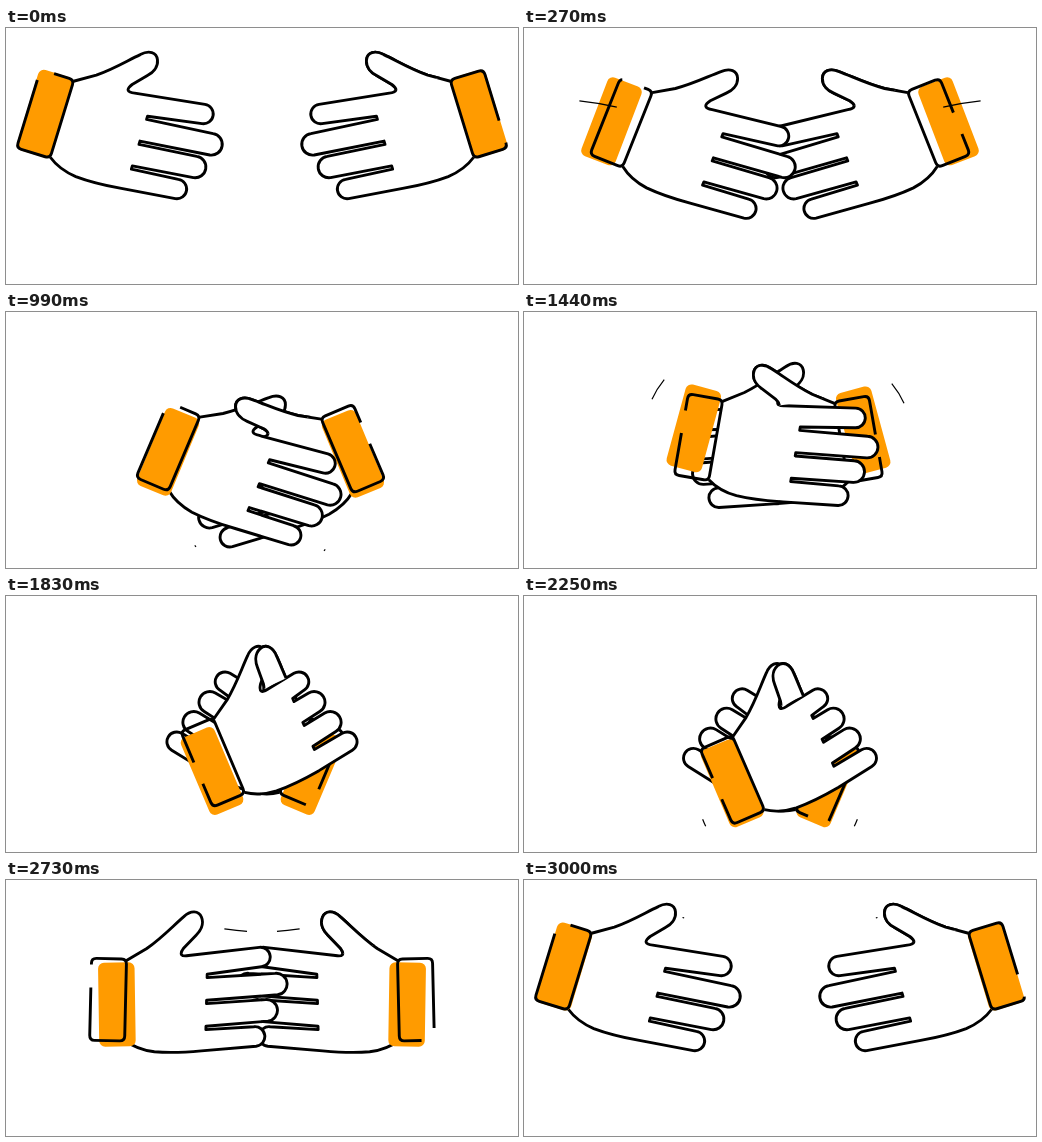
Write an HTML page that moves like this. It is 512x256 px and loops after 3030 ms.

```html
<!DOCTYPE html>
<html lang="en">
<head>
<meta charset="utf-8">
<title>Handshake</title>
<style>
  html, body { margin: 0; width: 100%; height: 100%; overflow: hidden; background: #fff; }
  svg { display: block; width: 100vw; height: 100vh; }
  .line { stroke: #000; stroke-width: 2.9; stroke-linejoin: round; fill: none; }
  .skin { fill: #fff; }
  .cloth { fill: #ff9b00; }
  .trail { stroke: #000; stroke-width: 1.2; fill: none; }
</style>
</head>
<body>
<svg viewBox="0 0 512 256">
  <defs><clipPath id="thumbClip"><polygon id="thumbArea"/></clipPath></defs>
  <g id="stage"></g>
</svg>
<script>
const LOOP = 3030, STEP = 30, WIDTH = 512;
const CUFF_LENGTH = 225.4, GAP = 23;
const CLOTH_LAG = 60, CLOTH_REACH = 10;
const stage = document.getElementById('stage');
const thumbArea = document.getElementById('thumbArea');

// Wrist of the left hand at each turning point; the right hand mirrors it.
const MOVES = [
  { at: 0, x: 56, y: 91, turn: 17 },         // apart
  { at: 560, x: 178, y: 113, turn: 27 },     // meet
  { at: 900, x: 178.5, y: 148, turn: 22.5 }, // shake down
  { at: 1250, x: 177, y: 106, turn: 26 },    // shake up
  { at: 1740, x: 222, y: 174, turn: -23 },   // clasp
  { at: 1950, x: 224.5, y: 137, turn: -23 }, // clasp up
  { at: 2160, x: 224.5, y: 181, turn: -23 }, // clasp down
  { at: 2400, x: 224.5, y: 168, turn: -24.5 }, // let go
  { at: 2970, x: 56, y: 91, turn: 17 },      // apart
  { at: LOOP, x: 56, y: 91, turn: 17 }
];
const TRAILS = [
  { from: 100, to: 578, d: 'M45 72Q85 75 126 88' },
  { from: 985, to: 1220, d: 'M190 235Q174 215 167 195' },
  { from: 1340, to: 1540, d: 'M148 59Q130 77 124 98' },
  { from: 2210, to: 2460, d: 'M182 231Q176 218 172 203' },
  { from: 2678, to: 3003, d: 'M243 51.5Q215 50 158.5 37.5' }
];
const FINGER_REACH = [143.5, 161, 152, 140];
const FINGER_TILT = -8 * Math.PI / 180;

const mix = (a, b, k) => a + (b - a) * k;
const clamp = v => Math.max(0, Math.min(1, v));
const ease = k => (1 - Math.cos(Math.PI * k)) / 2;
const wave = (t, peak) => Math.cos(2 * Math.PI * (t - peak) / LOOP);

const mixPose = (a, b, k) => ({
  x: mix(a.x, b.x, k), y: mix(a.y, b.y, k), turn: mix(a.turn, b.turn, k)
});

function poseAt(time) {
  const t = (time + LOOP) % LOOP;
  const i = MOVES.findIndex(move => move.at > t);
  const a = MOVES[i - 1], b = MOVES[i];
  return mixPose(a, b, ease((t - a.at) / (b.at - a.at)));
}

// The cloth trails behind the hand, but never further than its reach.
function clothPose(t, hand) {
  const late = poseAt(t - CLOTH_LAG);
  const distance = Math.hypot(late.x - hand.x, late.y - hand.y) || 1;
  return mixPose(hand, late, CLOTH_REACH * Math.tanh(distance / CLOTH_REACH) / distance);
}

function handPath(curl) {
  const cos = Math.cos(FINGER_TILT), sin = Math.sin(FINGER_TILT);
  let d = 'M0-39.5L20-52C35-63 45-74.5 56-84.5C63-91.5 71-91.5 74-84.5C77-77.5 73-70.5 69-66.5'
    + 'L57-53.5C52-46.5 55-44.5 62-46';
  FINGER_REACH.forEach((reach, i) => {
    const r = i % 3 ? 10.8 : 9.8;
    const x = mix(reach, 103 + 7 * i, curl) - r * cos;
    const y = mix(26.5 * i - 47.5, 24.7 * i - 42, curl) - r * sin;
    d += `L${x + r * sin} ${y - r * cos}A${r} ${r} 0 0 1 ${x - r * sin} ${y + r * cos}`;
    if (i < 3) d += `L81 ${26 * i - 27.7}v3.4`;
  });
  return d + 'L77 49C60 51 45 52 30 51C20 50 8 46 0 40';
}

function add(parent, tag, attrs = {}) {
  const el = document.createElementNS('http://www.w3.org/2000/svg', tag);
  for (const name in attrs) el.setAttribute(name, attrs[name]);
  return parent.appendChild(el);
}

function makeArm(parent) {
  return {
    hand: add(parent, 'path', { class: 'line skin' }),
    cloth: add(parent, 'rect', { class: 'cloth', x: -36, y: -42, width: 36.5, height: 84, rx: 6 }),
    cuff: add(parent, 'path', {
      class: 'line', pathLength: CUFF_LENGTH,
      'stroke-dasharray': `${CUFF_LENGTH - GAP} ${GAP}`,
      d: 'M-35-36V36Q-35 41-30 41H-5Q0 41 0 36V-36Q0-41-5-41H-30Q-35-41-35-36'
    })
  };
}

const mirror = { transform: `translate(${WIDTH} 0) scale(-1 1)` };
const rightSide = add(stage, 'g', mirror);
const leftSide = add(stage, 'g');
const frontSide = add(stage, 'g', mirror);
const right = makeArm(rightSide);
const left = makeArm(leftSide);
const thumbRoot = add(frontSide, 'g');
const thumb = add(thumbRoot, 'path', { class: 'line skin', 'clip-path': 'url(#thumbClip)' });
const rightTrails = add(frontSide, 'g');
for (const trail of TRAILS) {
  trail.lines = [stage, rightTrails].map(parent =>
    add(parent, 'path', { class: 'trail', d: trail.d, pathLength: 1 }));
}

const place = (el, { x, y, turn }) =>
  el.setAttribute('transform', `translate(${x} ${y}) rotate(${turn})`);

function drawArm(arm, hand, cloth, path, gapCentre) {
  place(arm.hand, hand);
  place(arm.cuff, hand);
  place(arm.cloth, cloth);
  arm.hand.setAttribute('d', path);
  arm.cuff.setAttribute('stroke-dashoffset', 5 - gapCentre - GAP / 2);
}

function drawTrail({ from, to, lines }, t) {
  const p = (t - from) / (to - from), visible = p > 0 && p < 1;
  const head = 1 - (1 - p) ** 2, tail = p * p;
  for (const line of lines) {
    line.setAttribute('visibility', visible ? 'visible' : 'hidden');
    if (!visible) continue;
    line.setAttribute('stroke-dasharray', `${head - tail} 2`);
    line.setAttribute('stroke-dashoffset', -tail);
  }
}

function draw(t) {
  const hand = poseAt(t), cloth = clothPose(t, hand);
  const path = handPath(clamp(-hand.turn / 20));

  // While shaking, the right hand sits slightly deeper than the left.
  const grip = clamp((hand.x - 120) / 50) * clamp(1 + hand.turn / 10);
  const deeper = pose => ({ ...pose, x: pose.x + 3 * grip, y: pose.y + 2 * grip });
  const rightHand = deeper(hand);

  drawArm(left, hand, cloth, path, 16 + 31 * wave(t, 2000));
  drawArm(right, rightHand, deeper(cloth), path, 60 + 30 * wave(t, 2350));

  // The right thumb lies over the left hand, up to the left index finger.
  const k = clamp((10 - hand.turn) / 28), edge = mix(3, 20, k);
  thumbArea.setAttribute('points',
    `${edge},${mix(-46, -88, k)} 57,-47 64,-53 115,-84 115,-140 ${edge},-140`);
  place(thumbRoot, rightHand);
  thumb.setAttribute('d', path);

  rightTrails.setAttribute('transform', `translate(${4 * grip} ${4 * grip})`);
  TRAILS.forEach(trail => drawTrail(trail, t));
}

const origin = performance.now();
function tick() {
  const t = (performance.now() - origin) % LOOP;
  draw(Math.floor(t / STEP) * STEP);
  requestAnimationFrame(tick);
}
tick();
</script>
</body>
</html>
```
